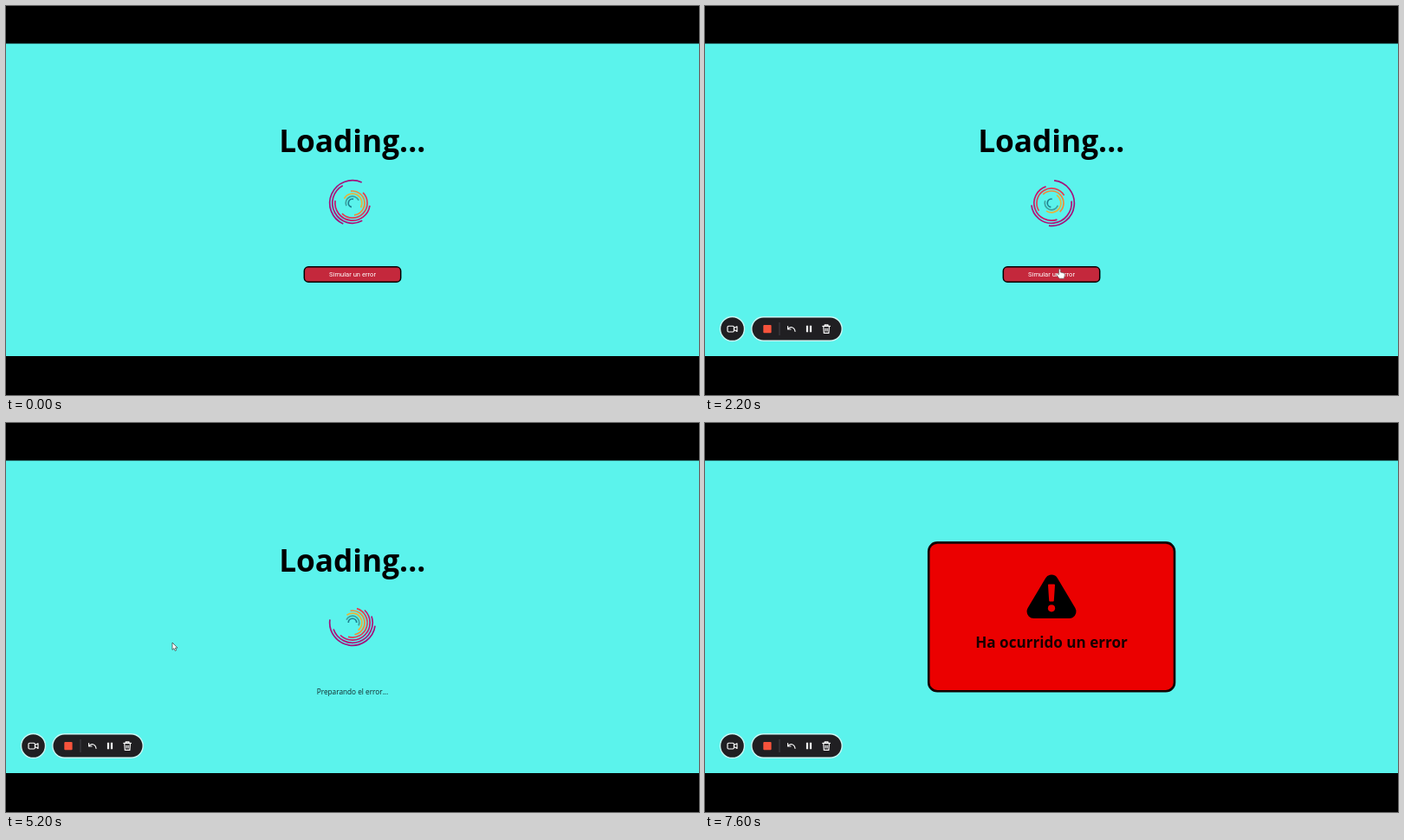
An HTML page for the animation above (8 s loop, 800 by 450 pixels).

```html
<!DOCTYPE html>
<html lang="es">
<head>
<meta charset="utf-8">
<title>Loading</title>
<style>
  html, body { margin: 0; width: 100%; height: 100%; overflow: hidden; background: #000; }
  svg { display: block; width: 800px; height: 450px; }
  text { text-anchor: middle; font-family: "Open Sans", "Noto Sans", sans-serif; }
  .bold { font-weight: 700; }
  .line { fill: none; stroke: #fff; stroke-width: 1.15; stroke-linecap: round; stroke-linejoin: round; }
</style>
</head>
<body>
<svg viewBox="0 0 800 450" xmlns="http://www.w3.org/2000/svg">
  <rect width="800" height="450" fill="#000"/>
  <rect y="43.5" width="800" height="361.5" fill="#5bf3ec"/>

  <g id="loading">
    <g id="head">
      <text class="bold" x="399.7" y="168.5" font-size="35.2">Loading...</text>
      <g id="rings" fill="none" stroke-width="1.7"></g>
    </g>
    <g id="button">
      <rect x="344.3" y="301.8" width="111.4" height="17.4" rx="4.8" fill="#c4283c" stroke="#000" stroke-width="1.5"/>
      <text x="400" y="312.6" font-size="7.6" fill="#fff" style="font-family: Roboto, Arial, sans-serif">Simular un error</text>
    </g>
    <text id="wait" x="400" y="313.9" font-size="8.25" fill="#10282a">Preparando el error...</text>
  </g>

  <g id="card">
    <rect x="258.2" y="138.4" width="283.8" height="171.8" rx="10" fill="#eb0000" stroke="#100" stroke-width="2.6"/>
    <path d="M400 183.5 L420.5 218 H379.5 Z" stroke="#000" stroke-width="16" stroke-linejoin="round"/>
    <path d="M397 187.5 H403 L401.8 205.5 H398.2 Z" fill="#eb0000" stroke="#eb0000" stroke-width="2" stroke-linejoin="round"/>
    <circle cx="400" cy="214.3" r="4.1" fill="#eb0000"/>
    <text class="bold" x="400" y="259.8" font-size="17.1" fill="#180000">Ha ocurrido un error</text>
  </g>

  <g id="tools">
    <g fill="#201f22" stroke="#c9f8f5" stroke-width="1.4">
      <circle cx="31.5" cy="373.5" r="14"/>
      <rect x="53.8" y="359.8" width="104.4" height="27.4" rx="13.7"/>
    </g>
    <g class="line">
      <rect x="26" y="370.2" width="7.4" height="6.8" rx="1.2"/>
      <path d="M33.6 372.6 L37 370.8 V376.4 L33.6 374.6"/>
      <path d="M95.6 370.6 V374 H99 M95.8 373.8 C98 370.2 103.2 371 104 376.4"/>
      <path d="M135.8 370.4 H144.4 M138.2 370.2 V368.8 H142 V370.2 M136.8 370.6 L137.3 378.4 H142.9 L143.4 370.6 M139.1 373 V376 M141.1 373 V376"/>
    </g>
    <rect x="67.3" y="369" width="9.3" height="9.2" rx="1" fill="#f6533c"/>
    <path d="M86 366 V381" stroke="#434246"/>
    <path d="M118 369.8 V377.2 M122 369.8 V377.2" stroke="#fff" stroke-width="2.2"/>
  </g>

  <path id="arrow" d="M0 0 V8.4 L1.9 6.7 L3.2 9.5 L4.6 8.9 L3.4 6.1 H6 Z" fill="#fff" stroke="#333" stroke-width=".7"/>
  <path id="hand" d="M0 .8 Q.9 -.3 1.8 .8 V4 L5.8 5 Q7 5.4 6.8 7 L6 11.2 H.6 L-3 6.8 Q-2.4 5 0 6.6 Z" fill="#fff" stroke="#555" stroke-width=".6"/>
</svg>
<script>
const LOOP = 8000, STEP = 100;
const CLICK = 2300, FAIL = 7500;
const CX = 400, CY = 228;
const COLORS = ['#a3127d', '#b01279', '#c8146c', '#e23d52', '#f08a3a', '#e6b53c', '#3f9f9e', '#1c7f8f'];

// [time, angle of the outer ring, angle between neighbouring rings]
const SPIN = [
  [0, 204, -53], [1400, 500, -168], [3200, 1010, -426],
  [4000, 1218, -521], [5200, 1538, -747], [7100, 2125, -916]
];
// [time, x, y]
const MOUSE = [[300, 472, 61], [1000, 440, 156], [1300, 408.5, 304]];

const $ = id => document.getElementById(id);
const show = (id, on) => { $(id).style.display = on ? '' : 'none'; };
const clamp = v => Math.min(1, Math.max(0, v));

function sample(keys, t) {
  let i = 1;
  while (i < keys.length - 1 && t > keys[i][0]) i++;
  const a = keys[i - 1], b = keys[i];
  const k = (t - a[0]) / (b[0] - a[0]);
  return a.slice(1).map((v, j) => v + (b[j + 1] - v) * k);
}

const rings = COLORS.map((color, i) => {
  const ring = document.createElementNS('http://www.w3.org/2000/svg', 'path');
  const r = 26.3 - 3.08 * i;
  // half circle centred on angle 0
  ring.setAttribute('d', `M0 ${-r} A${r} ${r} 0 0 1 0 ${r}`);
  ring.setAttribute('stroke', color);
  $('rings').append(ring);
  return ring;
});

function drawMouse(t) {
  const overButton = t >= 1300 && t < CLICK;
  const parked = t >= 3800 && t < 5900;
  show('hand', overButton);
  show('arrow', parked || (t >= 300 && t < 1300));
  const [x, y] = parked ? [192, 254] : sample(MOUSE, Math.min(t, 1300));
  $(overButton ? 'hand' : 'arrow').setAttribute('transform', `translate(${x} ${y})`);
}

function draw(t) {
  const clicked = t >= CLICK, failed = t >= FAIL;
  show('loading', !failed);
  show('card', failed);
  show('button', !clicked);
  show('wait', clicked);
  $('head').setAttribute('transform', `translate(0 ${clicked ? 3 : 0})`);
  $('tools').style.opacity = clamp((t - 500) / 600);

  const [angle, gap] = sample(SPIN, t);
  rings.forEach((ring, i) =>
    ring.setAttribute('transform', `translate(${CX} ${CY}) rotate(${angle + gap * i})`));
  drawMouse(t);
}

const start = performance.now();
function tick() {
  const t = (performance.now() - start) % LOOP;
  draw(Math.floor(t / STEP) * STEP);
  requestAnimationFrame(tick);
}
tick();
</script>
</body>
</html>
```
